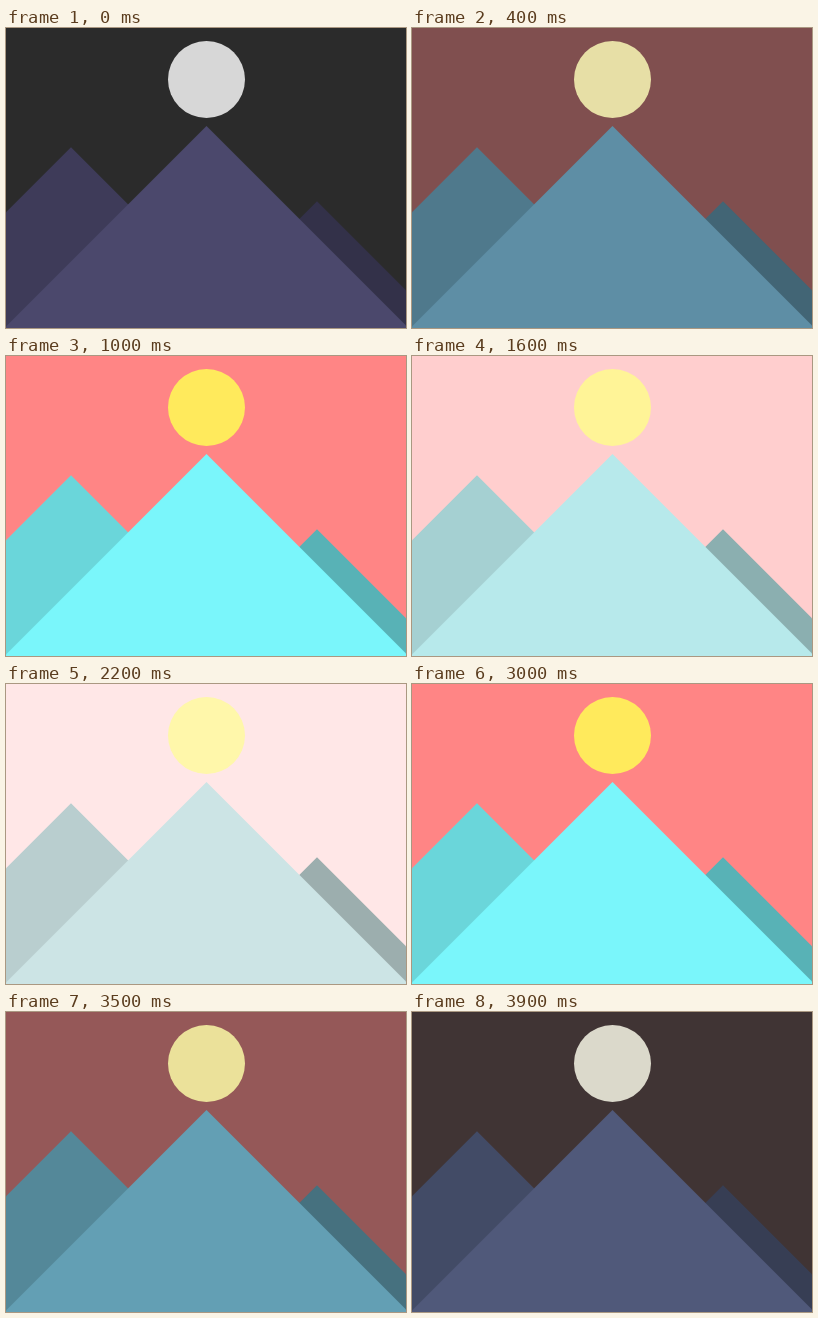
Animation of 400 by 300 pixels, one loop 4 s. Source, as an HTML page with a canvas:

```html
<!DOCTYPE html>
<html lang="en">
<head>
<meta charset="utf-8">
<title>Mountains from night to noon</title>
<style>
  html, body { margin: 0; width: 100%; height: 100%; overflow: hidden; }
  canvas { display: block; }
</style>
</head>
<body>
<canvas id="stage" width="400" height="300"></canvas>
<script>
const ctx = document.getElementById('stage').getContext('2d');
const LOOP = 4000, STEP = 100;

const rgb = hex => [1, 3, 5].map(i => parseInt(hex.slice(i, i + 2), 16));

// Colours at night, morning and noon.
const sky = ['#2b2b2b', '#ff8585', '#ffffff'].map(rgb);
const sun = ['#d7d7d7', '#ffea5c', '#fffabe'].map(rgb);
const rock = ['#4b486c', '#7af6fb', '#e0e0e0'].map(rgb);

// Distant rock is darker, and the contrast fades towards noon.
const shade = light => rock.map((color, i) => color.map(v => v * (light + 0.046 * i)));
const leftRock = shade(0.822);
const rightRock = shade(0.678);

function colorAt(stops, phase) {
  const i = Math.min(1, Math.floor(phase));
  const mixed = stops[i].map((v, c) => Math.round(v + (stops[i + 1][c] - v) * (phase - i)));
  return `rgb(${mixed})`;
}

// A peak whose sides fall at 45 degrees.
function peak(x, y, color) {
  ctx.fillStyle = color;
  ctx.beginPath();
  ctx.moveTo(x, y);
  ctx.lineTo(x + 300, y + 300);
  ctx.lineTo(x - 300, y + 300);
  ctx.fill();
}

function draw(now) {
  const t = Math.floor((now % LOOP) / STEP) * STEP;
  const phase = 2 - Math.abs(t - LOOP / 2) / 1000; // 0 at night, 2 at noon

  ctx.fillStyle = colorAt(sky, phase);
  ctx.fillRect(0, 0, 400, 300);

  ctx.fillStyle = colorAt(sun, phase);
  ctx.beginPath();
  ctx.arc(200.5, 51.5, 38.5, 0, 2 * Math.PI);
  ctx.fill();

  peak(65, 119.2, colorAt(leftRock, phase));
  peak(311, 173.2, colorAt(rightRock, phase));
  peak(200.5, 98, colorAt(rock, phase));
}

const start = performance.now();
function tick() {
  draw(performance.now() - start);
  requestAnimationFrame(tick);
}
tick();
</script>
</body>
</html>
```
